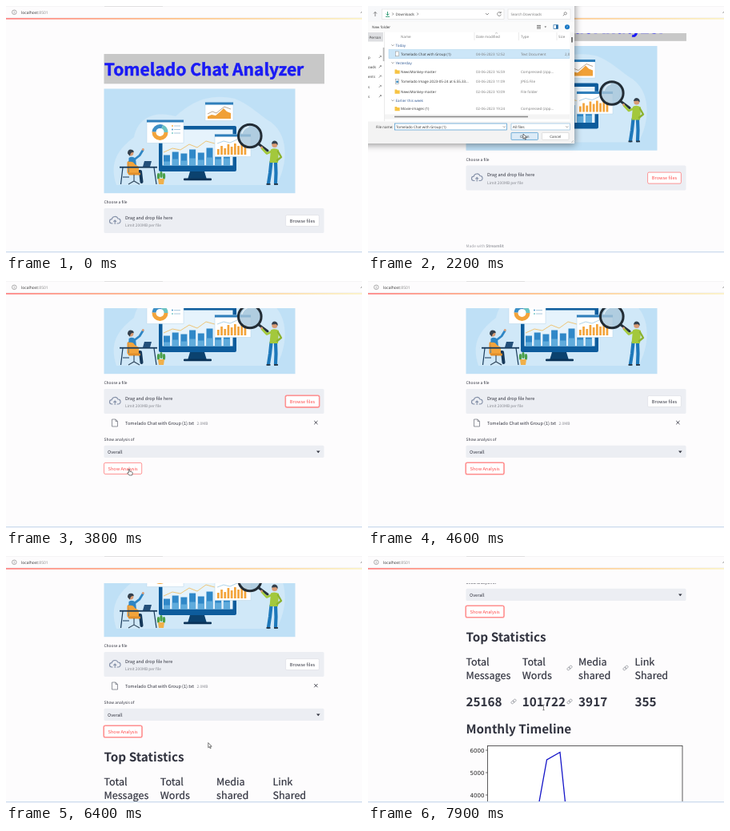
Write an HTML page that moves like this. It is 445 by 309 pixels and loops after 8 s.

```html
<!DOCTYPE html>
<html lang="en">
<head>
<meta charset="utf-8">
<title>Chat analyzer demo</title>
<style>
html, body { margin: 0; width: 100%; height: 100%; overflow: hidden; background: #fdfcfd; }
svg { display: block; width: 100vw; height: 100vh; }
text { font-family: 'Noto Sans CJK JP', 'Noto Sans CJK SC', 'Noto Sans', sans-serif; fill: #31333f; white-space: pre; text-rendering: geometricPrecision; }
#dialog text, .ui { font-family: 'Open Sans', 'Noto Sans', sans-serif; fill: #333; }
#dialog text.soft { fill: #777; }
#dialog text.group { fill: #2a5592; }
.axis { font-family: 'DejaVu Sans', sans-serif; fill: #222; }
.soft { fill: #85878f; }
.mid { text-anchor: middle; }
.title { font-weight: 700; fill: #1a1af5; stroke: #1a1af5; stroke-width: .5; }
.semi { font-weight: 500; stroke: #31333f; stroke-width: .2; }
.red text { fill: #ff4b4b; }
.red .face { stroke: #ff6b6b; }
.ring { visibility: hidden; }
.focus .ring { visibility: visible; }
#dialog { filter: drop-shadow(1px 2px 4px rgba(0,0,0,.4)); }
</style>
</head>
<body>
<svg id="stage" viewBox="0 0 445 309" preserveAspectRatio="none"></svg>
<script>
const LOOP = 8000, STEP = 100;
const CHAT = 'Tomelado Chat with Group (1)';

const box = (x, y, w, h, fill, extra = '') =>
  `<rect x="${x}" y="${y}" width="${w}" height="${h}" fill="${fill}" ${extra}/>`;
const label = (x, y, size, str, extra = '') =>
  `<text x="${x}" y="${y}" font-size="${size}" ${extra}>${str}</text>`;
const line = (d, color, width = .7, extra = '') =>
  `<path d="${d}" fill="none" stroke="${color}" stroke-width="${width}" ${extra}/>`;
const shape = (d, fill, extra = '') => `<path d="${d}" fill="${fill}" ${extra}/>`;
const disc = (x, y, r, fill, extra = '') => `<circle cx="${x}" cy="${y}" r="${r}" fill="${fill}" ${extra}/>`;
const group = (id, body, extra = '') => `<g id="${id}" ${extra}>${body}</g>`;
const bars = (x, base, pitch, width, heights, color) =>
  heights.map((h, i) => box(x + i * pitch, base - h, width, h, color)).join('');

function illustration() {
  const panel = (x, y, w, h) =>
    box(x, y, w, h, '#fff', 'stroke="#b5d3e8" stroke-width=".5"') + box(x, y, w, 3, '#2f7fbb');
  const ring = (color, dash, offset) =>
    disc(192.5, 158, 7.5, 'none', `stroke="${color}" stroke-width="5" stroke-dasharray="${dash} 60" stroke-dashoffset="${offset}"`);
  const leaf = (x, y) => `<ellipse cx="${x}" cy="${y}" rx="1.7" ry="4" fill="#4aa04a"/>`;
  const limb = (d, color, width) => line(d, color, width, 'stroke-linecap="round" stroke-linejoin="round"');
  return box(122.5, 103.5, 239, 130.7, '#bfe0f6') +
    shape('M138 224C128 194 142 178 160 164C166 136 190 132 212 138C230 122 252 108 286 116C302 122 312 132 326 142C356 158 352 200 338 224Z', '#d0e8f8') +
    // monitor
    box(191, 150, 97, 57, '#0d5c9c', 'rx="2"') + box(195.5, 154.5, 88, 45, '#e6f3fc') +
    bars(197, 199.5, 10.7, 8, [13, 17, 15, 20, 16, 22, 18, 20], '#3088c8') +
    bars(197, 199.5, 10.7, 8, [5, 8, 6, 9, 7, 10, 8, 9], '#5fabdc') +
    line('M197 183l11-5 10 2 11-7 10 4 11-8 11 3 10-7 12 1', '#f0b955', .8) +
    shape('M230 207H248L251 217H227Z', '#0b426f') + box(222, 215.5, 35, 2.8, '#0a3358', 'rx="1"') +
    // floating panels
    panel(176, 142.5, 46, 29) + ring('#f3a43b', 24, 0) + ring('#3d8fc6', 14, -24) + ring('#6cc3c2', 9.2, -38) +
    [150, 154.5, 159].map((y, i) => disc(208, y, .9, ['#f3a43b', '#3d8fc6', '#6cc3c2'][i]) + box(210, y - .5, 8, 1, '#a8c8de')).join('') +
    panel(249, 120.5, 35, 23) +
    shape('M252 141V138l5-2 5 1 6-5 4-4 4 4 5 2V141Z', '#f0a037') + line('M252 135l6-3 5 2 6-5 4-3 8 3', '#8a6a4a', .6) +
    panel(261, 160.5, 45, 28) + bars(264, 186, 4.2, 2.7, [7, 11, 8, 13, 10, 14, 11, 15, 13], '#f3a43b') +
    line('M264 172l8-3 8 2 9-4', '#79b5da', .6) +
    // magnifier
    limb('M315.5 172.5L327 181', '#26323e', 3) +
    disc(304.8, 162.5, 14.3, '#a8c6d9', 'fill-opacity=".8" stroke="#222c35" stroke-width="3"') +
    limb('M295 159q2-6 8-8', '#e3f0f8', 1.5) +
    // standing figure
    limb('M331.5 195L330 209L328 222M337 195L337.5 209L337 222', '#1d78ba', 4.2) +
    shape('M331 179.5Q336 177 341 180L340 196H329.5Z', '#a3c83c') +
    limb('M331.5 182L326 184.5L320 178', '#a3c83c', 2.6) + limb('M340 182L344 189L339 193', '#8db32f', 2.4) +
    disc(319.5, 177, 1.4, '#d99b74') +
    disc(335.8, 173.5, 3.5, '#d99b74') + shape('M332 172.5q.5-4 4-4q4.500 1 3.500 5.500l-2-2z', '#34404d') +
    box(325.5, 222, 5, 1.8, '#273747') + box(335, 222, 5, 1.8, '#273747') +
    // desk and seated figure
    box(151.5, 194, 4, 16, '#e9922c', 'rx="2"') +
    limb('M157 207L168 207L169.500 220', '#17395a', 4) +
    shape('M153.5 190Q158 187 162 191L164 208H153Z', '#2f86c4') +
    limb('M160.5 192L167 187L171 180.5', '#2f86c4', 2.8) + disc(171.3, 179.5, 1.4, '#d99b74') +
    disc(156, 184, 3.4, '#d99b74') + shape('M152 184.5q0-5.500 5-4.800q3.500 1 2.500 3.500q-4-1-4.500 4.500z', '#34404d') +
    shape('M153 195q6-1.500 8 3l5 3v8h-12z', '#f3a43b') + box(153, 208.5, 15, 3, '#e18e2a', 'rx="1"') +
    line('M160 211V219M153 223L160 219L167 223', '#31485d', 1.1) +
    box(142, 200.8, 47, 1.8, '#17395a') + line('M146 202L143.5 223M185 202L188 223M146 214H154', '#17395a', 1.2) +
    shape('M171 201L173 194H182L180 201Z', '#24507a') +
    leaf(190.5, 213) + leaf(194, 211) + leaf(197.5, 213) + shape('M190 216H198L197 223H191Z', '#f0b04a');
}

const button = (id, x, y, w, str) => group(id,
  box(x - .5, y - .5, w + 1, 15, 'none', 'rx="2" stroke="#ff9090" stroke-width="1.1" class="ring"') +
  box(x, y, w, 14, '#fff', 'rx="1.6" stroke="#dddfe4" stroke-width=".7" class="face"') +
  label(x + w / 2, y + 9.2, 5.6, str, 'class="mid"'));

const chain = (x, y, i) => group('chain' + i,
  `<g transform="translate(${x} ${y}) rotate(-40)">` +
  box(-3.6, -1.5, 4.2, 3, 'none', 'rx="1.5" stroke="#9a9ca3" stroke-width=".8"') +
  box(-.6, -1.5, 4.2, 3, 'none', 'rx="1.5" stroke="#9a9ca3" stroke-width=".8"') + '</g>');

function page() {
  const stats = [['Total', 'Messages', 25168], ['Total', 'Words', 101722], ['Media', 'shared', 3917], ['Link', 'Shared', 355]];
  const bold = 'font-weight="700"', semi = 'class="semi"';
  const results = label(122.5, 389.8, 15.3, 'Top Statistics', bold) +
    stats.map(([a, b, n], i) => {
      const x = 122.5 + i * 70.3;
      return label(x, 419.5, 12.6, a, semi) + label(x, 436.5, 12.6, b, semi) + label(x, 470.8, 15.3, n, bold);
    }).join('') +
    [[252, 423], [322, 423], [182, 465], [252, 465]].map(([x, y], i) => chain(x, y, i)).join('') +
    label(122.5, 505, 15.3, 'Monthly Timeline', bold) +
    box(149.5, 520.5, 243.5, 180, '#fff', 'stroke="#333" stroke-width=".8"') +
    [6000, 5000, 4000].map((n, i) => label(145.5, 528.7 + 28 * i, 7.1, n, 'class="axis" text-anchor="end"') +
      line(`M147 ${526 + 28 * i}h2.5`, '#333', .7)).join('') +
    line('M207 629L223.5 538L240 528.5L248.5 610', '#1414c8', 1.3);
  const fileRow = line('M132.5 291h4.5l2.5 2.500v6.500h-7zM137 291v2.500h2.500', '#777a84', .8) +
    label(149, 297.5, 5.6, CHAT + '.txt') + label(238.5, 297.5, 4.9, '2.0MB', 'class="soft"') +
    line('M385.3 293l4.2 4.2m0-4.2l-4.2 4.2', '#31333f', .9);
  const analysis = label(122.5, 317.5, 4.9, 'Show analysis of') +
    box(122.5, 323.7, 275, 15.3, '#eceef3', 'rx="1.6"') + label(127, 333.6, 5.6, 'Overall') +
    shape('M388 330.6h4.6l-2.3 2.6z', '#31333f') + button('show', 122.5, 345.5, 47.2, 'Show Analysis');
  return box(122.5, 60, 275.5, 37.3, '#c8c8c8') +
    label(122.8, 87, 21, 'Tomelado Chat Analyzer', 'class="title"') +
    illustration() + label(122.5, 247, 4.9, 'Choose a file') +
    box(122.5, 253, 275, 31, '#eceef3', 'rx="1.6"') +
    line('M133.500 272h-1.300a2.700 2.700 0 0 1 0-5.400a4.100 4.100 0 0 1 7.800-.6a3 3 0 0 1 .2 6h-1.700M136.200 273v-5m-1.800 1.800l1.800-1.800l1.800 1.800', '#8490a8', 1.1) +
    label(149, 266.5, 5.6, 'Drag and drop file here') + label(149, 276, 4.9, 'Limit 200MB per file', 'class="soft"') +
    button('browse', 349.6, 261.6, 41.8, 'Browse files') +
    group('footer', label(122.5, 355.5, 4.9, 'Made with <tspan font-weight="700">Streamlit</tspan>', 'class="soft" opacity=".8"')) +
    group('uploaded', fileRow + analysis) + group('results', results);
}

function dialog() {
  const F = 4.5, soft = 'class="soft"';
  const fileIcon = y => box(34.5, y - 3, 4.2, 5.8, '#fff', 'stroke="#888" stroke-width=".5"');
  const imageIcon = y => fileIcon(y) + box(35.3, y - 1, 2.6, 2.6, '#3d8fc6');
  const folder = y => shape(`M33.5 ${y - 2.5}h2.4l.8 1h3v4.2h-6.2z`, '#f6c344');
  const rows = [
    [60, fileIcon, CHAT, '04-06-2023 12:52', 'Text Document', '2,0'],
    [82, folder, 'NewsMonkey-master', '03-06-2023 16:59', 'Compressed (zipp...', ''],
    [94.5, imageIcon, 'Tomelado Image 2023-05-24 at 6.55.33...', '03-06-2023 11:09', 'JPEG File', ''],
    [107, folder, 'NewsMonkey-master', '02-06-2023 10:09', 'File folder', ''],
    [128.5, folder, 'Movie-images (1)', '02-06-2023 19:24', 'Compressed (zipp...', ''],
  ];
  const field = (x, y, w, h, stroke = '#bbb', extra = '') => box(x, y, w, h, '#fff', `stroke="${stroke}" stroke-width=".6" ${extra}`);
  return box(-10, -10, 268, 182, '#f3f3f3') + box(-10, -10, 268, 29.5, '#f7f8fa') +
    line('M9 13V7.5m-2 2l2-2l2 2', '#555') + field(17.5, 4, 152.5, 12.5, '#ddd') +
    line('M24.5 7v4.5m-2-1.8l2 2l2-2M22 13.3h5', '#24956c', .9) +
    line('M30.3 8.5l1.5 1.5l-1.5 1.5M61.3 8.5l1.5 1.5l-1.5 1.5M147 9l2 2l2-2', '#666') + label(34.5, 11.7, F, 'Downloads') +
    line('M166 8.6a2.4 2.4 0 1 0 .4 2M166.2 7v1.8h-1.8', '#666') +
    field(175, 4, 78, 12.5, '#ddd') + label(178.5, 11.7, F, 'Search Downloads', soft) +
    disc(246.7, 9.3, 1.6, 'none', 'stroke="#555" stroke-width=".6"') + line('M245.5 10.5l-1.6 1.7', '#555') +
    box(-10, 19.5, 268, 13, '#fbfbfb') + label(5, 28, F, 'New folder') +
    line('M211 24.4h5M211 26.2h5M211 28h5', '#555', .8) + shape('M220.5 25.5h2.6l-1.3 1.6z', '#555') +
    box(232, 23.7, 5.6, 4.8, '#fff', 'stroke="#286ea8" stroke-width=".7"') + box(235, 23.7, 2.6, 4.8, '#286ea8') +
    disc(249, 26.2, 3, '#1576c4') + `<text x="249" y="27.8" font-size="4.4" class="mid" style="fill:#fff">?</text>` +
    box(-10, 32.5, 268, 112, '#fff') + box(0, 33, 19, 11.5, '#dedfe2') + label(-1, 40.7, F, '- Person') +
    ['p', 'oads', 'ents', 's', 's'].map((s, i) => label(0, 65.8 + i * 12.3, F, s) +
      line(`M13.7 ${65 + i * 12.3}l3-3m-1.8-.2l2 2`, '#777', .8)).join('') +
    line('M20.5 32.5V144M133 33V43M188.5 33V43M236 33V43', '#ddd', .6) + box(18.7, 52, 1.7, 17, '#b8b8b8') +
    [[41, 'Name'], [135, 'Date modified'], [191, 'Type'], [238, 'Size']].map(([x, s]) => label(x, 39.8, F, s, soft)).join('') +
    line('M159 34.5l1.5-1.2l1.5 1.2', '#888', .5) +
    [[49, 'Today'], [71, 'Yesterday'], [118, 'Earlier this week']].map(([y, s]) =>
      line(`M29.5 ${y - .6}l1.4 1.4l1.4-1.4`, '#555', .6) + label(34.5, y + 1.7, F, s, 'class="group"')).join('') +
    group('picked', box(26, 54.6, 226, 11, '#cce6f8', 'stroke="#a4cfec" stroke-width=".5"')) +
    rows.map(([y, icon, name, date, type, size]) => icon(y) + label(41, y + 1.7, F, name) +
      label(135, y + 1.7, F, date, soft) + label(191, y + 1.7, F, type, soft) + label(246, y + 1.7, F, size, soft)).join('') +
    box(252.5, 32.5, 5.5, 112, '#f4f4f4') + box(254, 39, 2, 6.5, '#777') +
    box(21, 135.5, 231, 6, '#f4f4f4') + box(33, 137.7, 167, 1.6, '#8b8b8b') +
    label(10, 152.8, F, 'File name:') + field(33.5, 147, 140, 8, '#2583c5') + line('M168.8 150.4l1.5 1.5l1.5-1.5', '#666', .6) +
    group('filename', label(35, 152.8, F, CHAT)) + group('caret', line('M35 148.5v5', '#333', .5)) +
    `<g id="types">${field(179, 147, 73.5, 8)}</g>` + label(181, 152.8, F, 'All files') + line('M247.3 150.4l1.5 1.5l1.5-1.5', '#666', .6) +
    `<g id="open">${field(179, 158.4, 33.5, 9, '#2583c5', 'rx="1"')}</g>` + label(195.7, 164.6, F, 'Open', 'class="mid"') +
    field(217.5, 158.4, 33.5, 9, '#ccc', 'rx="1"') + label(234.2, 164.6, F, 'Cancel', 'class="mid"') +
    line('M254 171l3-3m-1.3 3l1.3-1.3', '#999', .5);
}

const cursors = {
  arrow: shape('M0 0V6.2L1.5 4.9L2.5 7.2L3.4 6.8L2.4 4.6H4.4Z', '#fff', 'stroke="#222" stroke-width=".6"'),
  hand: shape('M-.7 0q.7-.8 1.4 0v2.7l3 .8q.7.3.5 1.4l-.6 2.6h-3.6l-2.4-3q.4-1 1.7 0z', '#fff', 'stroke="#222" stroke-width=".6"'),
  beam: line('M-1.2-3.2H1.2M0-3.2V3.2M-1.2 3.2H1.2', '#444', .6),
};

document.getElementById('stage').innerHTML =
  `<defs><linearGradient id="glow"><stop stop-color="#ff5757"/><stop offset=".5" stop-color="#ffae5c"/><stop offset="1" stop-color="#fbeeb0"/></linearGradient>
  <clipPath id="view"><rect y="34" width="445" height="273"/></clipPath></defs>` +
  box(0, 0, 445, 309, '#fdfcfd') + `<g clip-path="url(#view)">${group('page', page())}</g>` +
  line('M0 .3H445', '#ececee', .6) + line('M123 .4H196', '#d5d5d5', .7) +
  disc(10.3, 7.8, 2.8, 'none', 'stroke="#777" stroke-width=".6"') + line('M10.3 7.4v2M10.3 6v.7', '#777', .6) +
  label(19, 9.8, 5, 'localhost<tspan fill="#888">:8501</tspan>', 'class="ui"') + line('M443.5 9l1.5-2', '#777') +
  line('M0 14.4H445', '#ececee', .6) + box(0, 15.2, 445, 1.4, 'url(#glow)', 'opacity=".9"') + line('M0 307.7H445', '#bfd3ea', 1.1) +
  group('status', box(-1, 299, 29, 8, '#e3e5e8', 'rx="1"') + label(1, 304.6, 4, '#media-shared', 'class="ui" opacity=".55"')) +
  group('dialog', dialog()) +
  group('cursor', Object.entries(cursors).map(([name, art]) => group(name, art)).join(''));

const el = id => document.getElementById(id);
const show = (id, on) => { el(id).style.display = on ? '' : 'none'; };
const within = (t, a, b) => t >= a && t < b;

// Eased interpolation through [time, ...values] stops.
function track(stops, t) {
  const next = stops.findIndex(s => s[0] > t);
  if (next < 0) return stops.at(-1).slice(1);
  if (!next) return stops[0].slice(1);
  const [from, to] = [stops[next - 1], stops[next]];
  const u = (t - from[0]) / (to[0] - from[0]), e = u * u * (3 - 2 * u);
  return from.slice(1).map((v, i) => v + (to[i + 1] - v) * e);
}

const scrollStops = [[100, 0], [700, 53.5], [2900, 53.5], [3400, 118], [6300, 118], [6800, 262], [7200, 262], [7600, 283]];
const cursorStops = [[200, 300, 285], [800, 357.5, 217.5], [1250, 357.5, 217.5], [1700, 75, 59], [1900, 75, 59],
  [2200, 194, 160], [2500, 194, 160], [3000, 250, 245], [3500, 154, 235.5], [4000, 154, 235.5], [4500, 428, 298],
  [6300, 260, 240], [6800, 190.5, 178.5], [7200, 190.5, 178.5], [7600, 219.5, 189.5]];

function render(t) {
  const [scroll] = track(scrollStops, t);
  el('page').setAttribute('transform', `translate(0 ${-scroll})`);
  const [x, y] = track(cursorStops, t);
  el('cursor').setAttribute('transform', `translate(${x} ${y})`);
  show('cursor', within(t, 200, 4500) || t >= 6300);
  const beam = t >= 7300, hand = within(t, 800, 1000) || within(t, 3400, 4100);
  show('beam', beam);
  show('hand', hand);
  show('arrow', !beam && !hand);

  show('dialog', within(t, 1000, 2500));
  const chosen = t >= 1800;
  show('picked', chosen);
  show('filename', chosen);
  show('caret', !chosen);
  el('open').firstChild.setAttribute('fill', t >= 2100 ? '#dcebf7' : '#fff');
  el('types').firstChild.setAttribute('stroke', within(t, 2000, 2500) ? '#7db5dc' : '#bbb');

  const uploaded = t >= 2800;
  show('uploaded', uploaded);
  show('footer', !uploaded);
  show('results', t >= 5900);
  const browseFocus = within(t, 2500, 4000);
  el('browse').setAttribute('class', (within(t, 800, 4000) ? 'red' : '') + (browseFocus ? ' focus' : ''));
  el('show').setAttribute('class', (t >= 3400 ? 'red' : '') + (t >= 4000 ? ' focus' : ''));
  show('status', within(t, 6600, 7100));
  for (let i = 0; i < 4; i++) show('chain' + i, t >= 7400 + 100 * i);
}

const start = performance.now();
function tick() {
  const t = (performance.now() - start) % LOOP;
  render(Math.floor(t / STEP) * STEP);
  requestAnimationFrame(tick);
}
render(0);
requestAnimationFrame(tick);
</script>
</body>
</html>
```
